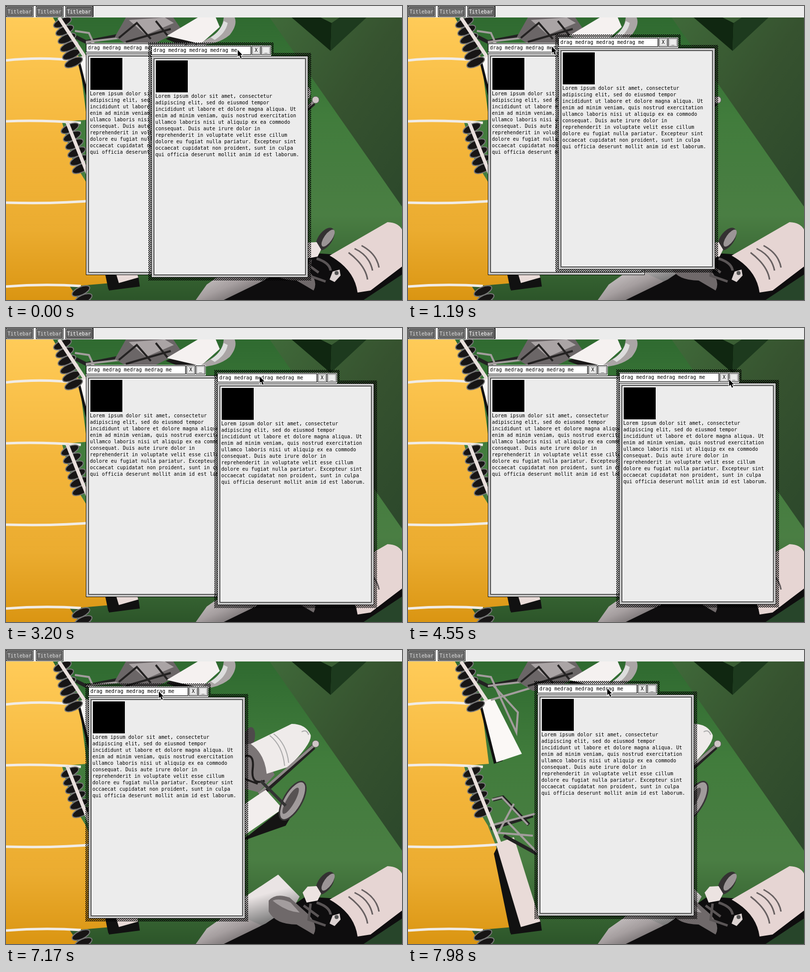
Recreate the animation shown at these times as an HTML page with a canvas. Size 793x589 px, loop 8000 ms.

```html
<!DOCTYPE html>
<html lang="en">
<head>
<meta charset="utf-8">
<title>Desktop windows</title>
<style>
  html, body { margin: 0; width: 100%; height: 100%; overflow: hidden; background: #3d6d37; }
  body { position: relative; font: 9.97px/13px "DejaVu Sans Mono", monospace; color: #000; cursor: default; }
  body * { box-sizing: border-box; }
  .scene, .win, .win > *, .bar, .task, #pointer { position: absolute; left: 0; top: 0; }
  .bar { width: 793px; height: 23px; background: #ececec; }
  .task {
    width: 55px; height: 22px; padding: 3px 0 0 1px; white-space: pre;
    border: 1px solid #000; background: #6c6c6c; color: #ddd;
    box-shadow: inset 0 0 0 1px #eee, inset 0 0 0 2px #222;
    line-height: 16px; padding-left: 2px;
  }
  .task.on { color: #fff; box-shadow: inset 0 0 0 1px #fff, inset 0 0 0 2px #000, 1px 0 #000; }
  .win { width: 314px; height: 465px; }
  .win .hatch { left: -6px; top: -6px; }
  .win .strip { width: 240px; height: 21px; background: #fff; }
  .win .cell {
    top: 1px; height: 18px; border: 1px solid #000; background: #ececec;
    line-height: 16px; text-align: center; white-space: pre;
    box-shadow: inset 0 0 0 1px #fff, inset 0 0 0 2px #aaa;
  }
  .win .cell.name { width: 200px; padding-left: 3px; text-align: left; background: #fff; box-shadow: inset 0 0 0 1px #ddd; }
  .win .pane {
    top: 21px; width: 314px; height: 444px; padding: 4px; border: 1px solid #000;
    background: #b8b8b8; box-shadow: inset 0 0 0 1px #fff;
  }
  .win .pane div { height: 100%; border: 1px solid #000; background: #ececec; }
  .win .square { left: 9px; top: 30px; width: 64px; height: 64px; background: #000; }
  .win .copy { left: 8px; top: 95px; white-space: pre; }
</style>
</head>
<body>
<svg class="scene" width="793" height="589" viewBox="0 0 793 589">
  <defs>
    <linearGradient id="grass" x1="0" y1="0" x2="0" y2="1">
      <stop offset="0" stop-color="#2f6a30"/><stop offset=".35" stop-color="#417c3c"/>
      <stop offset=".7" stop-color="#4a7e43"/><stop offset="1" stop-color="#2c5529"/>
    </linearGradient>
    <linearGradient id="field" x1="0" y1="0" x2="0" y2="1">
      <stop offset="0" stop-color="#ffcb58"/><stop offset=".45" stop-color="#f3b53a"/>
      <stop offset=".75" stop-color="#ebac30"/><stop offset="1" stop-color="#da9512"/>
    </linearGradient>
    <linearGradient id="shade" x1="0" y1="0" x2="1" y2="1">
      <stop offset="0" stop-color="#3f6939"/><stop offset=".5" stop-color="#36522f"/>
      <stop offset="1" stop-color="#2c482b"/>
    </linearGradient>
    <linearGradient id="steel" x1="0" y1="0" x2="1" y2="1">
      <stop offset="0" stop-color="#ece8e8"/><stop offset=".5" stop-color="#a59e9f"/>
      <stop offset="1" stop-color="#2b2829"/>
    </linearGradient>
    <linearGradient id="plate" x1="0" y1="0" x2=".4" y2="1">
      <stop offset=".5" stop-color="#eae4e4"/><stop offset="1" stop-color="#777"/>
    </linearGradient>
    <g id="spring" fill="#171515" stroke="#777" stroke-width="2"></g>
  </defs>
  <path fill="url(#grass)" d="M0 23H793V589H0Z"/>
  <path fill="url(#shade)" d="M528 23H793V402Z"/>
  <path fill="#102711" d="M572 23H630L652 34 650 90Z"/>
  <path fill="#1d3a1e" d="M652 34L668 23H722L650 90Z"/>

  <!-- yellow lanes -->
  <path fill="url(#field)" d="M0 23H94L122 72 146 102 162 228 112 232 134 310 160 352 176 392 210 555 128 562 146 589H0Z"/>
  <g fill="none" stroke="#f1ece6" stroke-width="5">
    <path d="M0 109Q72 101 146 110M0 231Q70 228 150 234M0 394Q100 397 186 389M0 562Q76 556 150 561"/>
  </g>

  <!-- loaders on the left -->
  <path fill="#111" d="M142 106L150 102 190 222 172 228ZM172 408L180 392 232 550 205 568Z"/>
  <path fill="#111" d="M208 542L265 541 268 562 206 570Z"/>
  <path fill="#fbf8f6" d="M146 102L172 97 228 208 177 225Z"/>
  <path fill="#e9dbd8" d="M176 388L212 375 265 544 226 555Z"/>
  <use href="#spring" x="97" y="24"/>
  <use href="#spring" x="112" y="236"/>
  <use href="#spring" x="134" y="562"/>
  <g fill="none" stroke="#222" stroke-width="7">
    <path d="M140 62L160 72 222 60M170 300L190 295 242 350M166 358L250 332M192 372L258 408"/>
  </g>
  <g fill="none" stroke="#a39d9d" stroke-width="4">
    <path d="M138 50L166 54 217 165 220 125 170 70M160 72L245 62M166 100L260 72M168 300L188 295 240 350M164 352L255 328M180 368L212 308M178 366L250 372M200 345L258 405"/>
  </g>
  <path stroke="#e9dfdc" stroke-width="7" d="M106 23L158 102M122 232L184 388"/>

  <!-- carriage at the top -->
  <path fill="#6b6667" d="M218 62L240 23H335L352 48 300 74 250 82Z"/>
  <path fill="#aaa4a5" d="M246 28L318 23 336 34 280 58Z"/>
  <path fill="none" stroke="#242222" stroke-width="4" d="M226 64L262 34 290 66M300 30L324 60M240 72L330 46"/>
  <path fill="#1b1919" d="M320 66L340 56 396 76 380 90Z"/>
  <path fill="#f5f1f0" d="M322 60L384 23H420L428 42 390 76Z"/>
  <path fill="#aaa5a5" d="M436 23H458Q464 38 448 58 424 78 384 78L410 62Q434 48 436 23Z"/>
  <path fill="#ddd" d="M410 63Q430 50 436 30L444 34Q440 54 418 68Z"/>

  <!-- carriage in the middle -->
  <ellipse cx="487" cy="177" rx="11" ry="23" fill="#4e4a4b" transform="rotate(12 487 177)"/>
  <path fill="#7b7576" d="M470 190L505 186 538 250 506 285 470 276Z"/>
  <path fill="none" stroke="#1f1d1d" stroke-width="4" d="M474 214Q498 204 494 238T518 262M472 256L504 268"/>
  <path fill="#efebea" d="M490 188L572 148Q600 148 610 170 614 186 566 234L522 248Q518 208 490 188Z"/>
  <path fill="none" stroke="#aaa" stroke-width="2" d="M528 171Q554 192 558 232M536 168Q562 188 566 226M592 164Q602 158 606 170"/>
  <path stroke="#232121" stroke-width="10" d="M616 194L508 292"/>
  <path stroke="#8f8989" stroke-width="5" d="M618 190L506 288"/>
  <circle cx="620" cy="188" r="7" fill="#cfc6c6" stroke="#555"/>
  <path fill="#151414" d="M470 384L556 316 590 300 560 352 520 366Z"/>
  <path fill="#f2eeed" d="M470 314L520 280 554 318 470 376Z"/>
  <ellipse cx="574" cy="302" rx="18" ry="43" fill="#a19b9c" stroke="#393637" stroke-width="3" transform="rotate(30 574 302)"/>
  <ellipse cx="570" cy="302" rx="8" ry="30" fill="#575253" transform="rotate(30 570 302)"/>
  <path stroke="#333" stroke-width="6" d="M510 262L560 312"/>

  <!-- carriage at the bottom -->
  <path fill="url(#steel)" d="M380 589L402 558 473 508 560 540 570 589Z"/>
  <path fill="url(#plate)" d="M440 520L545 450 588 494 560 545 520 555Z"/>
  <path fill="#0e0d0e" d="M436 589L520 548 600 494 662 498 706 540 793 520V589Z"/>
  <path fill="#27452a" d="M716 589L793 538V589Z"/>
  <path fill="#6f696a" d="M526 502Q540 486 568 496L606 530Q626 552 616 570L582 550Q540 550 526 524Z"/>
  <path fill="#a39d9e" d="M534 502Q548 496 570 506L588 526Q560 524 534 502Z"/>
  <ellipse cx="639" cy="467" rx="14" ry="26" fill="#343132" transform="rotate(35 639 467)"/>
  <ellipse cx="645" cy="465" rx="8" ry="20" fill="#9b9596" transform="rotate(35 645 465)"/>
  <path fill="#ece3e1" d="M594 486L604 474 622 473 631 488 624 502 602 506Z"/>
  <path fill="none" stroke="#5a5556" stroke-width="5" d="M610 508L606 540 640 552M622 506Q648 514 650 530M596 512L626 534"/>
  <path fill="#e6d5d3" d="M648 500L764 433Q786 434 793 448V522L730 570 704 574Q698 528 648 500Z"/>
  <path fill="none" stroke="#676061" stroke-width="3" d="M698 486Q728 500 734 530M712 480Q742 496 747 524M686 494Q720 520 724 548"/>
  <path fill="#dcd3d2" d="M648 548L654 532 668 528 670 540 658 553Z"/>
  <circle cx="662" cy="535" r="4" fill="#555"/>
</svg>

<div class="bar" id="bar"></div>
<svg id="pointer" width="14" height="20" style="z-index:9">
  <path d="M1 1V14.5L4 11.5 6.5 17.5 9 16.5 6.5 11H10.5Z" stroke="#fff" stroke-width="2" paint-order="stroke"/>
</svg>

<script>
const LOOP = 8000;
const LABEL = 'drag medrag medrag medrag me';
const COPY = `Lorem ipsum dolor sit amet, consectetur
adipiscing elit, sed do eiusmod tempor
incididunt ut labore et dolore magna aliqua. Ut
enim ad minim veniam, quis nostrud exercitation
ullamco laboris nisi ut aliquip ex ea commodo
consequat. Duis aute irure dolor in
reprehenderit in voluptate velit esse cillum
dolore eu fugiat nulla pariatur. Excepteur sint
occaecat cupidatat non proident, sunt in culpa
qui officia deserunt mollit anim id est laborum.`;

function add(parent, cls, text = '', left, tag = 'div') {
  const el = document.createElement(tag);
  el.className = cls;
  el.textContent = text;
  if (left !== undefined) el.style.left = left + 'px';
  parent.append(el);
  return el;
}

function drawHatch(canvas) {
  canvas.width = 326;
  canvas.height = 477;
  const ctx = canvas.getContext('2d');
  for (let y = 0; y < 477; y++) {
    const width = y < 21 ? 251 : 326;
    for (let x = -(y % 4); x < width; x += 4) ctx.fillRect(x, y, Math.min(2, width - x), 1);
  }
}

function makeWindow() {
  const win = add(document.body, 'win');
  win.hatch = add(win, 'hatch', '', undefined, 'canvas');
  drawHatch(win.hatch);
  add(win, 'strip');
  add(win, 'cell name', LABEL, 0);
  add(win, 'cell', 'X', 201).style.width = '18px';
  add(win, 'cell', '_', 220).style.width = '19px';
  add(add(win, 'pane'), '');
  add(win, 'square');
  add(win, 'copy', COPY);
  return win;
}

const spring = document.getElementById('spring');
for (let i = 0; i < 6; i++) {
  const coil = document.createElementNS('http://www.w3.org/2000/svg', 'ellipse');
  const x = 16 + i * 4.5, y = 9 + i * 16;
  for (const [key, value] of Object.entries({ cx: x, cy: y, rx: 19, ry: 8, transform: `rotate(-24 ${x} ${y})` }))
    coil.setAttribute(key, value);
  spring.append(coil);
}

const bar = document.getElementById('bar');
const tasks = [0, 60, 119].map(x => add(bar, 'task', 'Titlebar', x));
tasks[2].classList.add('on');
const back = makeWindow(), front = makeWindow();
const pointer = document.getElementById('pointer');

// Each move: start, end, number of steps, evenly timed way points.
const frontMoves = [
  [90, 540, 9, [[291, 79], [297.5, 66.5], [301, 63]]],
  [2740, 3320, 11, [[301, 63], [299, 62], [412, 84], [424, 90.2], [423, 89]]],
];
const backMoves = [
  [7170, 7920, 13, [[160, 74], [175, 72], [233.5, 71], [263, 70], [262, 70]]],
  [7980, 7980, 1, [[262, 70], [259, 68]]],
];
const pointerMoves = [
  [90, 540, 9, [[463, 87], [469.5, 76.5], [471, 73]]],
  [840, 1600, 13, [[471, 73], [380, 83], [270, 80], [330, 70], [387, 69]]],
  [2740, 3320, 11, [[387, 69], [385, 67], [500, 91], [508, 97], [507, 95]]],
  [3550, 4250, 13, [[507, 95], [560, 170], [610, 200], [640, 150], [646, 103]]],
  [4550, 4720, 4, [[646, 103], [629, 97]]],
  [5670, 6240, 11, [[629, 97], [431, 123], [335, 130], [312, 118], [316, 112]]],
  [6530, 6870, 7, [[316, 112], [299, 83]]],
  [7170, 7920, 13, [[299, 83], [320, 80], [385.5, 78], [402, 78], [401, 78]]],
  [7980, 7980, 1, [[401, 78], [398, 76]]],
];

function place(el, moves, t) {
  const [start, end, steps, pts] = moves.findLast(m => m[0] <= t) || moves[0];
  let p = 0;
  if (t >= end) p = 1;
  else if (t >= start) p = (Math.floor((t - start) / (end - start) * (steps - 1)) + 1) / steps;
  const at = p * (pts.length - 1);
  const i = Math.min(Math.floor(at), pts.length - 2);
  const [x, y] = pts[i].map((v, k) => Math.round(v + (pts[i + 1][k] - v) * (at - i)));
  el.style.transform = `translate(${x}px, ${y}px)`;
}

const show = (el, on) => { el.style.visibility = on ? 'visible' : 'hidden'; };

function render(t) {
  place(front, frontMoves, t);
  place(back, backMoves, t);
  place(pointer, pointerMoves, t);
  show(front, t < 5380);
  front.hatch.style.visibility = 'inherit';
  show(tasks[2], t < 5380);
  show(back.hatch, t >= 5900);
}

const begin = performance.now();
function tick() {
  render((performance.now() - begin) % LOOP);
  requestAnimationFrame(tick);
}
tick();
</script>
</body>
</html>
```
